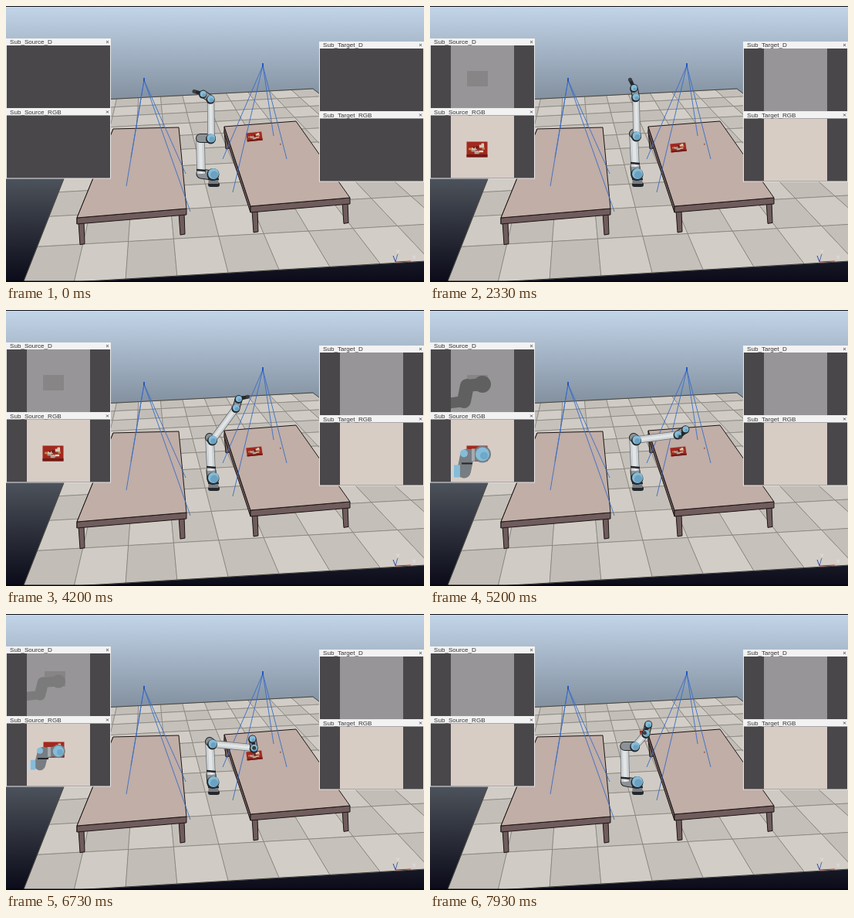
Write an HTML page with a canvas that moves like this. It is 542x357 px and loops after 8000 ms.

```html
<!DOCTYPE html>
<html lang="en">
<head>
<meta charset="utf-8">
<title>Robot arm simulation</title>
<style>
  html, body { margin: 0; width: 100%; height: 100%; overflow: hidden; background: #0a0b1a; }
  canvas { display: block; width: 542px; height: 357px; }
</style>
</head>
<body>
<canvas id="stage" width="542" height="357"></canvas>
<script>
const ctx = document.getElementById('stage').getContext('2d');
const LOOP = 8000, CAMERAS_ON = 70, ARM_IN_VIEW = 4450, LIFT = 6930, VIEW_EMPTY = 7880;
const BLUE = '#86bcd9', GREY = '#777d82', DARK = '#24272b', STEEL = '#cdd1d3';

function poly(points, fill, stroke, width = 1) {
  ctx.beginPath();
  points.forEach(([x, y]) => ctx.lineTo(x, y));
  ctx.closePath();
  if (fill) { ctx.fillStyle = fill; ctx.fill(); }
  if (stroke) { ctx.strokeStyle = stroke; ctx.lineWidth = width; ctx.stroke(); }
}

function line(a, b, color, width = 1, cap = 'butt') {
  ctx.beginPath();
  ctx.moveTo(...a);
  ctx.lineTo(...b);
  ctx.strokeStyle = color;
  ctx.lineWidth = width;
  ctx.lineCap = cap;
  ctx.stroke();
}

function disc([x, y], r, fill) {
  ctx.beginPath();
  ctx.arc(x, y, r, 0, Math.PI * 2);
  ctx.fillStyle = fill;
  ctx.fill();
}

function rect(x, y, w, h, fill) {
  ctx.fillStyle = fill;
  ctx.fillRect(x, y, w, h);
}

const linear = v => v;
const easeIn = v => v * v;
const smooth = v => v * v * (3 - 2 * v);
const mix = (a, b, k) => a + (b - a) * k;
const progress = (t, from, to) => Math.max(0, Math.min(1, (t - from) / (to - from)));
const noise = n => { const v = Math.sin(n * 127.1) * 43758.5453; return v - Math.floor(v); };
const polar = ([x, y], length, degrees) => {
  const a = degrees * Math.PI / 180;
  return [x + Math.cos(a) * length, y - Math.sin(a) * length];
};

// Perspective map from the unit square to a quad (top left, top right, bottom right, bottom left).
function perspective([[x0, y0], [x1, y1], [x2, y2], [x3, y3]]) {
  const dx1 = x1 - x2, dx2 = x3 - x2, sx = x0 - x1 + x2 - x3;
  const dy1 = y1 - y2, dy2 = y3 - y2, sy = y0 - y1 + y2 - y3;
  const det = dx1 * dy2 - dx2 * dy1;
  const g = (sx * dy2 - dx2 * sy) / det, h = (dx1 * sy - sx * dy1) / det;
  return (u, v) => {
    const w = g * u + h * v + 1;
    return [((x1 - x0 + g * x1) * u + (x3 - x0 + h * x3) * v + x0) / w,
            ((y1 - y0 + g * y1) * u + (y3 - y0 + h * y3) * v + y0) / w];
  };
}

const floorPoint = perspective([[115, 121.5], [398, 107], [680, 322], [21, 361]]);
const TILES = 10;

function drawBackground() {
  const sky = ctx.createLinearGradient(0, 0, 0, 357);
  ['#c3d5ea', '#8391a0', '#454a53', '#0a0a18'].forEach((color, i) => sky.addColorStop(i / 3, color));
  rect(0, 0, 542, 357, sky);
  const quad = (u, v, s) =>
    [floorPoint(u, v), floorPoint(u + s, v), floorPoint(u + s, v + s), floorPoint(u, v + s)];
  for (let i = 0; i < TILES; i++) {
    for (let j = 0; j < TILES; j++) {
      const shade = ((i + j) % 2 ? 193 : 206) + noise(i * 13 + j) * 5;
      poly(quad(i / TILES, j / TILES, 1 / TILES), `rgb(${shade},${shade - 4},${shade - 11})`, '#86827b', 0.7);
    }
  }
  poly(quad(0, 0, 1), null, '#33332f', 0.8);
  rect(0, 0, 542, 1, '#101216');
  rect(0, 355.5, 542, 1.5, '#05050c');
}

function drawTable(backLeft, backRight, frontRight, frontLeft) {
  const wood = '#705c5d', edge = '#1c1514';
  const lower = ([x, y]) => [x, y + 8];
  const leg = ([x, y], dx) => {
    const left = x + dx, top = y + 5, bottom = top + 16 + y * 0.05;
    poly([[left, top], [left + 7, top], [left + 8, bottom - 1], [left + 2, bottom]], wood, edge);
  };
  leg(backLeft, 0);
  leg(frontRight, -10);
  leg(frontLeft, 2);
  poly([backLeft, frontLeft, lower(frontLeft), lower(backLeft)], wood, edge);
  poly([frontLeft, frontRight, lower(frontRight), lower(frontLeft)], wood, edge);
  poly([backLeft, backRight, frontRight, frontLeft], '#c0aea7', edge);
}

function drawFrustum(apex, corners) {
  corners.forEach(corner => line(apex, corner, '#3a6cc6', 0.9));
  rect(apex[0] - 1, apex[1] - 3, 2, 5, '#2458bd');
}

// Printed red box with seeded label patches, centred on x, y.
function drawPackage(x, y, w, h, skew = 0) {
  const colors = ['#d8ccb8', '#c08a50', '#e0d7cc', '#6d1c17', '#b0a79a'];
  ctx.save();
  ctx.transform(1, -skew, skew * 1.5, 1, x, y);
  rect(-w / 2, -h / 2, w, h, '#a3281e');
  rect(-w / 2, h * 0.32, w, h * 0.18, '#6f1a14');
  for (let i = 0; i < 14; i++) {
    rect((noise(i + 4) * 0.7 - 0.42) * w, (noise(i + 40) * 0.64 - 0.42) * h,
      (0.08 + noise(i + 70) * 0.16) * w, (0.1 + noise(i + 90) * 0.12) * h, colors[i % colors.length]);
  }
  ctx.restore();
}

// time, base turn, forearm elevation, hand angle, tool angle, easing towards this pose
const POSES = [
  [950, 0, 92, 146, 165],
  [2330, 1, 91, 102, 115, smooth],
  [5200, 1, 8, 34, -125, easeIn],
  [6500, 1, -6, 100, -80, smooth],
  [LIFT, 1, -6, 100, -80],
  [7950, 0, 4, 75, -115]
];

function poseAt(t) {
  const next = POSES.findIndex(pose => pose[0] > t);
  if (next === 0) return POSES[0].slice(1, 5);
  const from = POSES[next - 1], to = POSES[next], ease = to[5] || linear;
  const k = ease(progress(t, from[0], to[0]));
  return [1, 2, 3, 4].map(i => mix(from[i], to[i], k));
}

function solveArm(t) {
  const [turn, elevation, hand, toolAngle] = poseAt(t);
  const shoulder = [mix(253, 266, turn), mix(217, 208, turn)];
  const elbow = [mix(252, 264, turn), mix(171, 165, turn)];
  const cap = [mix(266, 268, turn), mix(171, 168, turn)];
  // Turned away, the forearm is foreshortened and recedes up the picture.
  const [dx, dy] = polar([0, 0], 54, elevation);
  const wrist = [cap[0] + dx * mix(0.25, 1, turn), cap[1] + dy * 0.93 - Math.abs(dx) * (1 - turn) * 0.25];
  const wrist2 = polar(wrist, 12, hand);
  return { shoulder, elbow, cap, wrist, wrist2, tool: polar(wrist2, 12, toolAngle) };
}

function tube(a, b, width) {
  line(a, b, '#666c70', width + 0.5);
  line(a, b, STEEL, width - 1);
  line(a, b, '#e2e5e6', width * 0.4);
}

function housing(a, b, width) {
  line(a, b, DARK, width, 'round');
  line(a, b, '#8c9296', width - 2, 'round');
}

function joint([x, y], r) {
  disc([x - 0.5, y + 1], r, DARK);
  disc([x, y], r - 1, BLUE);
  disc([x + 1, y + 1.5], r - 3, '#6ba2c1');
}

function drawArm({ shoulder, elbow, cap, wrist, wrist2, tool }) {
  line([265, 231], [274, 231], DARK, 6, 'round');
  line([269, 218], [269, 230], GREY, 13);
  housing(shoulder, [267, 219], 13);
  tube(shoulder, elbow, 11);
  line([shoulder[0] - 6, shoulder[1] - 5], [shoulder[0] + 6, shoulder[1] - 4], DARK, 2.5);
  line([262, 224], [276, 224], DARK, 2);
  joint([269, 217], 8);
  housing(elbow, cap, 12);
  tube(cap, wrist, 9);
  joint(cap, 6.5);
  housing(wrist, wrist2, 10);
  line(wrist2, tool, DARK, 4.5);
  joint(wrist, 5.5);
  joint(wrist2, 5);
  disc(tool, 2.5, '#3b3e42');
}

// What the camera above the package sees; x, y is the picture's top left corner.
function drawSourceView(x, y, t, isDepth) {
  const enter = progress(t, ARM_IN_VIEW, 5100), leave = progress(t, LIFT, VIEW_EMPTY);
  const descent = smooth(progress(t, 5300, 6400));
  const rise = 10 * progress(t, 6300, 6600) + 14 * leave;
  const shift = -78 * easeIn(leave), scale = 1 - 0.2 * descent;
  const at = (px, py) => [x + px - 64 * (1 - enter) + shift, y + py * scale - 14 * leave];

  if (isDepth) rect(x + 21 + shift + rise * 0.2, y + 33 - rise, 27, 20, '#878586');
  else drawPackage(x + 34 + shift + rise * 0.1, y + 44 - rise, 27, 20);
  if (enter === 0) return;

  const level = mix(96, 123, descent), body = isDepth ? `rgb(${level},${level},${level})` : GREY;
  const start = at(-20, 72), elbow = at(17, 67), neck = at(21, 47), head = at(41, 45);
  line(start, elbow, isDepth ? body : STEEL, 14 * scale);
  line(elbow, neck, body, 18 * scale, 'round');
  line(neck, head, body, 16 * scale, 'round');
  disc(head, 11 * scale, body);
  if (isDepth) return;
  line(at(8, 59), at(8, 75), BLUE, 8 * scale);
  line(at(14, 57), at(28, 57), DARK, 2);
  line(at(29, 38), at(29, 54), '#a4aaad', 4);
  disc(at(17, 44), 5 * scale, BLUE);
  disc(head, 9 * scale, BLUE);
  disc(at(43, 47), 5 * scale, '#6fa8c8');
}

function drawWindow(x, y, title, color, t, drawContent) {
  rect(x, y, 136, 91, '#e9e9e9');
  rect(x, y, 136, 9, '#f2f2f2');
  rect(x + 1, y + 9, 134, 81, '#49474a');
  ctx.fillStyle = '#333';
  ctx.font = '8.1px "Liberation Sans", Arial, sans-serif';
  ctx.fillText(title, x + 5, y + 7);
  line([x + 130, y + 3], [x + 133, y + 6], '#333', 0.8);
  line([x + 133, y + 3], [x + 130, y + 6], '#333', 0.8);
  if (t < CAMERAS_ON) return;
  ctx.save();
  ctx.beginPath();
  ctx.rect(x + 27, y + 9, 82, 81);
  ctx.clip();
  rect(x + 27, y + 9, 82, 81, color);
  if (drawContent && t < VIEW_EMPTY) drawContent(x + 27, y + 9);
  ctx.restore();
}

function drawWindows(t) {
  [['Source', 0, 42], ['Target', 406, 46]].forEach(([name, x, y]) => {
    [['D', '#979597'], ['RGB', '#d8cdc5']].forEach(([channel, color], row) => {
      const content = name === 'Source' && ((px, py) => drawSourceView(px, py, t, channel === 'D'));
      drawWindow(x, y + row * 90.5, `Sub_${name}_${channel}`, color, t, content);
    });
  });
}

function drawAxes() {
  line([505, 331], [525, 330], '#c02a24', 1.2);
  line([505, 331], [508, 320], '#4b6ea8');
  line([505, 331], [502, 323], '#3342a8');
  ctx.font = 'bold 8px "Liberation Sans", Arial, sans-serif';
  ctx.fillStyle = '#dcdce0';
  ctx.fillText('y', 506, 319);
  ctx.fillText('x', 527, 327);
}

function draw(t) {
  const arm = solveArm(t);
  const fall = easeIn(progress(t, CAMERAS_ON, 300)), carry = progress(t, LIFT, 7950);
  const size = 1 - 0.4 * carry;
  const [px, py] = t < LIFT ? [322, 169 + 14 * fall] : arm.tool;
  drawBackground();
  drawTable([139, 159], [224, 157], [234, 262], [92, 274]);
  drawTable([283, 156], [376, 149], [446, 248], [317, 259]);
  rect(355, 178, 1.5, 1.5, '#8c4a40');
  drawPackage(px, py, 20 * size, 11 * size, 0.1);
  drawFrustum([179, 96], [[156, 233], [162, 196], [233, 217], [239, 266]]);
  drawFrustum([333, 77], [[281, 198], [294, 241], [347, 168], [364, 198]]);
  drawArm(arm);
  drawWindows(t);
  drawAxes();
}

const start = performance.now();
function frame() {
  draw((performance.now() - start) % LOOP);
  requestAnimationFrame(frame);
}
// The pose after the last key is never reached within a frame's reach of the loop end.
POSES.push([LOOP + 1, ...POSES[POSES.length - 1].slice(1)]);
frame();
</script>
</body>
</html>
```
